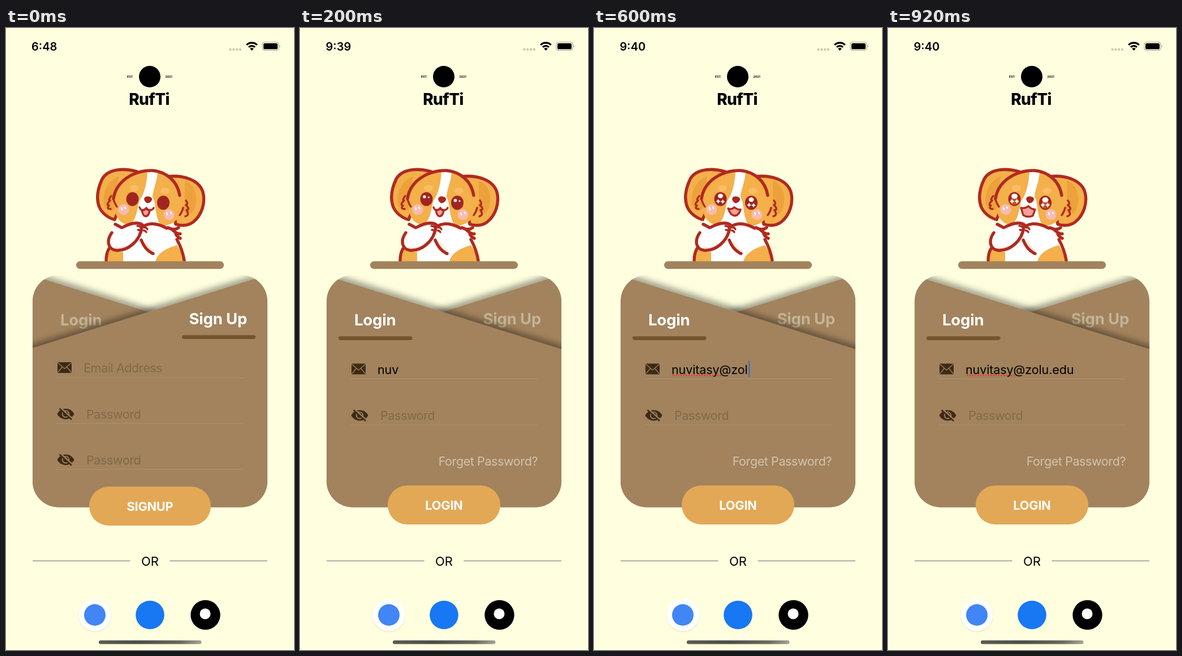
Recreate the animation shown at these times as an HTML page. Size 509x1100 px, loop 1 s.

```html
<!DOCTYPE html>
<html lang="en">
<head>
<meta charset="utf-8">
<style>
  html, body { margin: 0; width: 100%; height: 100%; overflow: hidden; background: #ffffdf; }
  svg { display: block; width: 509px; height: 1100px; font-family: Inter, "Liberation Sans", sans-serif; }

  /* --at: first fifth of the loop in which a part is shown */
  .one, .two, .four { animation: one 1s step-end infinite; animation-delay: calc((var(--at) - 5) * .2s); }
  .two { animation-name: two; }
  .four { animation-name: four; }
  @keyframes one { 0% { visibility: visible } 20%, 100% { visibility: hidden } }
  @keyframes two { 0% { visibility: visible } 40%, 100% { visibility: hidden } }
  @keyframes four { 0% { visibility: visible } 80%, 100% { visibility: hidden } }

  .clock { font-size: 20px; font-weight: 600; }
  .tab { font-size: 27.5px; font-weight: 700; fill: #fff; letter-spacing: -.2px; }
  .dim { fill: #c3b497; }
  .field { font-size: 21.5px; letter-spacing: -.4px; fill: #82694b; }
  .typed { font-size: 21.5px; letter-spacing: -.1px; }
  .button { font-size: 21.7px; font-weight: 700; fill: #fff; text-anchor: middle; letter-spacing: -.2px; }
  .tiny { font-size: 5.2px; font-weight: 700; }
  .brown { fill: #a2835d; }
  .gold { fill: #e3a856; }
  .bar { fill: #73522c; }
  .rule { stroke: #ab9173; stroke-width: 1; }
  .fur { fill: #f4b04a; }
  .inner { fill: #eca13b; }
  .line { stroke: #b02a20; stroke-width: 5.4; stroke-linecap: round; stroke-linejoin: round; }
  .thin { stroke-width: 3.4; }
  .open { fill: none; }
  .white { fill: #fff; }
</style>
</head>
<body>
<svg viewBox="0 0 509 1100">
  <defs>
    <clipPath id="panel"><rect x="47" y="437" width="415" height="410.5" rx="45.7"/></clipPath>
    <filter id="lift" filterUnits="userSpaceOnUse" x="0" y="380" width="509" height="540">
      <feDropShadow dx="0" dy="-7" stdDeviation="5.5" flood-color="#000" flood-opacity=".37"/>
    </filter>
    <filter id="soft" x="-20%" y="-20%" width="140%" height="140%">
      <feDropShadow dx="0" dy="1" stdDeviation="1.2" flood-color="#000" flood-opacity=".16"/>
    </filter>
    <linearGradient id="home">
      <stop stop-color="#5c5c54"/><stop offset=".4" stop-color="#4e4e48"/>
      <stop offset=".8" stop-color="#6a6a60"/><stop offset="1" stop-color="#a4a496"/>
    </linearGradient>
    <path id="loginCard" class="brown" filter="url(#lift)" d="M-13 419 L522 587 V900 H-13Z"/>
    <path id="signCard" class="brown" filter="url(#lift)" d="M522 417.5 L-13 585 V900 H522Z"/>

    <g id="mail">
      <rect x="-12.5" y="-9.5" width="25" height="19" rx="1.5" fill="#3d2a16"/>
      <path d="M-12-8.500 L0 2 L12-8.500 M-12 8.500 L-4-1 M12 8.500 L4-1" fill="none" stroke="#a2835d" stroke-width="1.2"/>
    </g>
    <g id="eye">
      <path d="M-15 0 C-9-12.500 9-12.500 15 0 C9 12.500-9 12.500-15 0Z" fill="#3d2a16"/>
      <circle r="5.8" fill="none" stroke="#a2835d" stroke-width="1.8"/>
      <path d="M-9-10.500 L12.500 9" stroke="#a2835d" stroke-width="3"/>
      <path d="M-11-9.500 L10.500 10" stroke="#3d2a16" stroke-width="2.4"/>
    </g>
    <path id="star" class="white" d="M0-4.5 Q.8-.8 4.5 0 Q.8.8 0 4.5 Q-.8.8-4.5 0 Q-.8-.8 0-4.5Z"/>

    <g id="glint">
      <circle class="white" cx="-3.5" cy="-4" r="2.8"/>
      <circle class="white" cx="4" cy="-3" r="1.6"/>
    </g>
    <g id="sparkle">
      <circle class="white" cx="-1" cy="-6.5" r="2.8"/>
      <use href="#star" x="2.5" y="2"/>
      <circle class="white" cx="-5" cy="1" r="1.6"/>
    </g>
    <g id="shine">
      <ellipse class="white" cx="0" cy="-5.5" rx="4.5" ry="4"/>
      <use href="#star" x="-4" y="4"/>
      <use href="#star" x="4" y="4.5"/>
    </g>
    <g id="glow">
      <ellipse cy="4" rx="8.5" ry="6.5" fill="#b9552f"/>
      <ellipse class="white" cx="0" cy="-5" rx="5.5" ry="4.6"/>
      <use href="#star" x="-4.2" y="4"/>
      <use href="#star" x="4.2" y="4"/>
    </g>
  </defs>

  <!-- status bar -->
  <g class="clock">
    <text class="one" style="--at:0" x="45" y="40">6:48</text>
    <text class="two" style="--at:1" x="45.5" y="40">9:39</text>
    <text class="two" style="--at:3" x="45.5" y="40">9:40</text>
  </g>
  <path d="M396.5 38 h18.500" stroke="#cbcbb3" stroke-width="4.4" stroke-linecap="round" stroke-dasharray="0 5.8"/>
  <g fill="none" stroke="#000" stroke-width="3.2">
    <path d="M425.2 30 A13 13 0 0 1 443.8 30"/>
    <path d="M429 33.9 A7.8 7.8 0 0 1 440 33.9"/>
  </g>
  <path d="M434.5 40 l-3.3-3.5 a4.7 4.7 0 0 1 6.6 0z"/>
  <rect x="453" y="25" width="29" height="14.5" rx="4.4" fill="none" stroke="#a3a392" stroke-width="1.2"/>
  <rect x="455" y="27" width="25" height="10.5" rx="2.6"/>
  <path d="M483.6 30 q2.4 2.2 0 4.6z" fill="#a3a392"/>

  <!-- heading -->
  <circle cx="254" cy="86" r="19"/>
  <text class="tiny" x="214" y="88">EST.</text>
  <text class="tiny" x="281.5" y="88">2021</text>
  <text x="253" y="136" text-anchor="middle" font-size="28" font-weight="800" letter-spacing="-.6">RufTi</text>

  <!-- puppy -->
  <path class="fur" d="M176 413 Q177 397 183 389 L208 394 V413Z"/>
  <path class="white" d="M196 346 L303 346 L298 372 Q309 390 315 413 H207 V396 Q181 396 180 376 Q183 354 196 346Z"/>
  <path class="fur" d="M264 413 Q268 394 302 384 Q311 397 316 413Z"/>
  <path class="line open" d="M177 411 Q177 399 182 390 M302 374 Q312 392 315 411"/>

  <path class="fur line" d="M232 254 C208 247 180 249 170 267 C162 284 159 302 165 317 C170 328 181 336 192 339 L212 290Z"/>
  <path class="fur line" d="M283 263 C312 259 341 268 348 290 C353 309 346 331 331 343 C322 350 310 350 300 347 L290 292Z"/>
  <path class="inner" d="M200 262 C180 270 170 290 173 312 C178 325 187 326 194 318 C190 294 198 276 200 262Z"/>
  <path class="inner" d="M316 270 C334 276 340 297 334 318 C329 331 320 333 313 323 C318 301 316 285 316 270Z"/>

  <path class="fur" d="M192 318 C187 274 220 251 258 252 C296 254 315 292 307 326 Q304 348 272 351 L217 349 Q194 344 192 318Z"/>
  <path class="white" d="M250 254 L268 254 C267 273 259 287 259 299 C266 309 262 332 274 350 L215 349 C232 342 231 320 236 305 C245 293 249 273 250 254Z"/>
  <path class="line open" d="M190 302 C194 273 222 252 258 252 C284 254 303 271 307 296"/>
  <path class="line open thin" d="M186 297 Q180 304 184 305 Q176 313 182 314 Q177 320 185 320 M190 303 Q193 312 196 316
    M318 305 Q323 311 318 313 Q326 321 319 322 Q325 331 317 333 M313 318 Q311 326 307 331"/>
  <ellipse cx="227" cy="283" rx="8" ry="5.5" fill="#fabc65"/>
  <ellipse cx="281" cy="288" rx="8" ry="5.5" fill="#fabc65"/>
  <circle cx="208" cy="321" r="9.5" fill="#f9bbb2"/>
  <circle cx="288" cy="330" r="9.5" fill="#f9bbb2"/>
  <path d="M204 318 l1 3 M210 317 l1 2 M284 327 l1 3 M291 326 l1 2" stroke="#fff" stroke-width="2.4" stroke-linecap="round"/>
  <path fill="#a8281f" d="M244 302 Q246 297 252 298 Q259 299 258 304 Q255 310 250 310 Q245 308 244 302Z"/>

  <g fill="#a02520">
    <ellipse cx="223.5" cy="302.5" rx="11" ry="12.3"/>
    <ellipse cx="278" cy="309" rx="11" ry="12.6"/>
  </g>
  <g class="one" style="--at:1"><use href="#glint" x="223.5" y="302.5"/><use href="#glint" x="278" y="309"/></g>
  <g class="one" style="--at:2"><use href="#sparkle" x="223.5" y="302.5"/><use href="#sparkle" x="278" y="309"/></g>
  <g class="one" style="--at:3"><use href="#shine" x="223.5" y="302.5"/><use href="#shine" x="278" y="309"/></g>
  <g class="one" style="--at:4"><use href="#glow" x="223.5" y="302.5"/><use href="#glow" x="278" y="309"/></g>

  <g class="line thin" fill="#f3a09a">
    <g class="two" style="--at:0">
      <path d="M240 322 Q242 333 247 333 Q253 332 254 322 Q250 322 248 319 Q245 322 240 322Z"/>
      <path class="open" d="M236 317 Q238 323 243 322 Q247 321 248 318 Q252 324 256 322 Q260 321 261 318"/>
    </g>
    <path class="two" style="--at:2" d="M237 319 Q243 322 248 317 Q254 322 259 321 Q256 332 248 332 Q241 331 237 319Z"/>
    <path class="one" style="--at:4" d="M235 318 Q242 320 248 315 Q254 321 260 321 L256 332 Q247 336 239 331Z"/>
  </g>

  <path class="white" d="M204 352 Q232 338 242 349 Q260 341 286 354 Q276 377 260 399 Q242 387 238 375 Q221 398 193 393 Q180 387 181 370 Q187 353 204 352Z"/>
  <path d="M193 388 Q215 393 232 374 M246 378 Q251 389 260 395" fill="none" stroke="#f7ecd6" stroke-width="4"/>
  <path class="line open" d="M193 347 Q199 350 204 353 M205 353 Q229 340 241 348 M187 362 C177 376 180 391 194 393 C215 395 237 377 240 352
    M239 375 Q246 393 260 399 M244 350 Q259 341 284 354
    M286 353 Q298 359 305 353 M294 357 Q303 365 308 364 M300 364 Q302 369 308 372"/>
  <path class="line open thin" d="M232 350 Q238 350 239 355 M233 357 Q238 357 238 361 M244 353 Q248 352 250 356 M243 358 Q246 358 248 361"/>
  <rect class="brown" x="124" y="412.5" width="261" height="13.5" rx="6.7"/>

  <!-- sign-up view -->
  <g class="one" style="--at:0">
    <g clip-path="url(#panel)">
      <use href="#loginCard"/>
      <text class="tab dim" x="96" y="526">Login</text>
      <use href="#signCard"/>
      <text class="tab" x="323.5" y="523.5">Sign Up</text>
      <rect class="bar" x="311" y="543.3" width="130" height="6.6" rx="3.3"/>
      <path class="rule" d="M89 618.5 H420 M89 699.5 H420 M89 780.5 H420"/>
      <use href="#mail" x="103.5" y="600.5"/>
      <use href="#eye" x="105.5" y="682.5"/>
      <use href="#eye" x="105.5" y="763.5"/>
      <text class="field" x="137" y="609">Email Address</text>
      <text class="field" x="142" y="690.5">Password</text>
      <text class="field" x="142" y="771.5">Password</text>
    </g>
    <rect class="gold" x="147" y="811" width="215" height="69" rx="34.5"/>
    <text class="button" x="254.5" y="853.5">SIGNUP</text>
  </g>

  <!-- login view -->
  <g class="four" style="--at:1">
    <g clip-path="url(#panel)">
      <use href="#signCard"/>
      <text class="tab dim" x="323.5" y="523.5">Sign Up</text>
      <use href="#loginCard"/>
      <text class="tab" x="96" y="526">Login</text>
      <rect class="bar" x="68" y="545.3" width="130.5" height="6.6" rx="3.3"/>
      <path class="rule" d="M89 620.5 H420 M89 702 H420"/>
      <use href="#mail" x="103.5" y="603"/>
      <use href="#eye" x="105.5" y="685"/>
      <text class="field" x="142" y="693">Password</text>
      <text class="field" x="420" y="773.5" text-anchor="end" style="fill:#d2c3ae">Forget Password?</text>
    </g>
    <rect class="gold" x="155" y="809" width="199" height="69" rx="34.5"/>
    <text class="button" x="254.5" y="851.5">LOGIN</text>
  </g>
  <path class="two" style="--at:3" d="M140.5 614.5 H224" stroke="#ec3b35" stroke-width="3" stroke-linecap="round" stroke-dasharray="0 4.6"/>
  <g class="typed">
    <text class="one" style="--at:1" x="137" y="611.5">nuv</text>
    <text class="one" style="--at:2" x="137" y="611.5">nuvitasy</text>
    <text class="one" style="--at:3" x="137" y="611.5">nuvitasy@zol</text>
    <text class="one" style="--at:4" x="137" y="611.5">nuvitasy@zolu.edu</text>
  </g>
  <rect class="one" style="--at:3" x="273" y="589" width="2.5" height="28" rx="1" fill="#3a73b8"/>

  <!-- other ways in -->
  <path d="M47 942.3 H219.5 M289.5 942.3 H462" stroke="#a0a0a0" stroke-width="1.8"/>
  <text x="254.5" y="950.5" font-size="22" text-anchor="middle">OR</text>
  <circle class="white" cx="157" cy="1038" r="28.5" filter="url(#soft)"/>
  <circle cx="157" cy="1038" r="19" fill="#4285f4"/>
  <circle cx="254.5" cy="1038" r="25.3" fill="#1877f2"/>
  <circle cx="352.5" cy="1038" r="26.2"/>
  <circle class="white" cx="352" cy="1036" r="9.5"/>
  <rect x="164" y="1083" width="181.5" height="6.5" rx="3.2" fill="url(#home)"/>
</svg>
</body>
</html>
```
